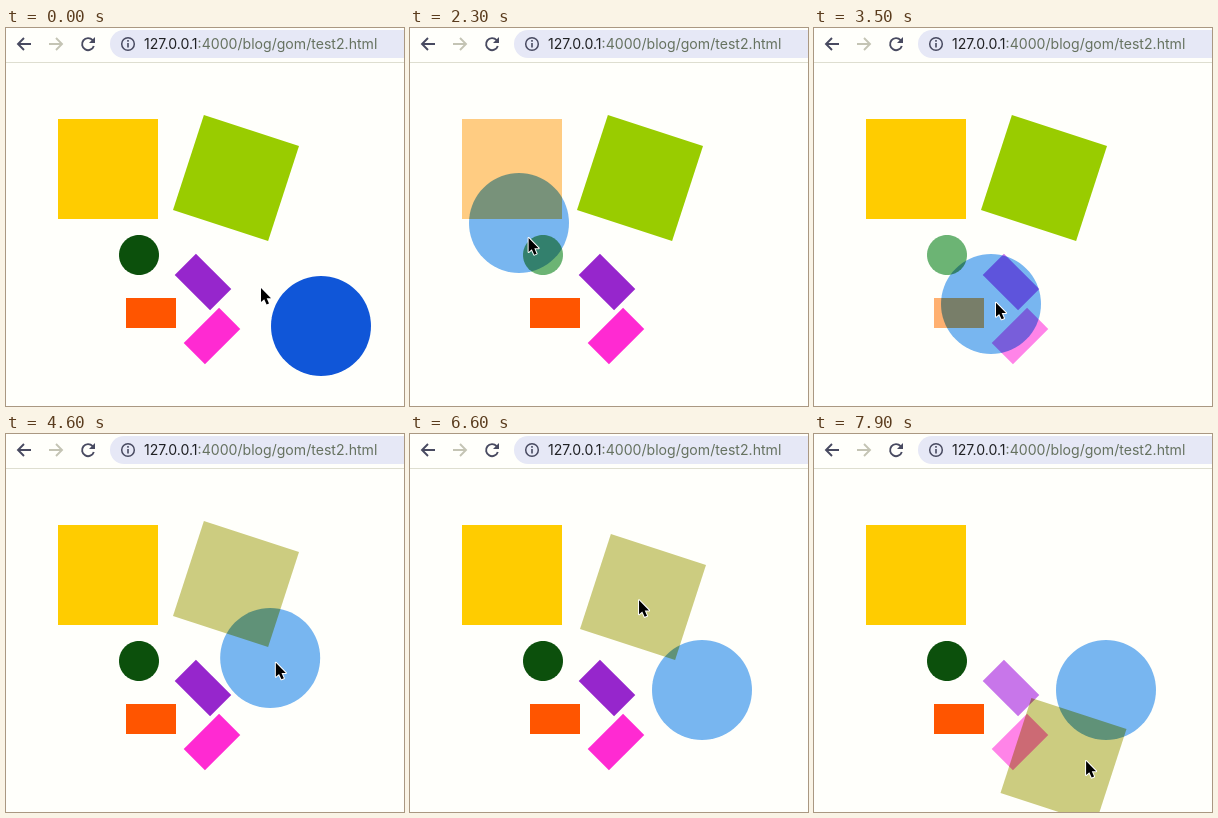
Recreate the animation shown at these times as an HTML page with a canvas. Size 398x378 px, loop 8 s.

```html
<!DOCTYPE html>
<html lang="en">
<head>
<meta charset="utf-8">
<title>Overlap test</title>
<style>
html, body { margin: 0; width: 100%; height: 100%; overflow: hidden; background: #fffffb; }
canvas, svg { position: absolute; left: 0; top: 0; display: block; }
text { font: 14.1px Inter, "Liberation Sans", sans-serif; }
</style>
</head>
<body>
<svg width="398" height="36" viewBox="0 0 398 36">
  <rect y="34" width="398" height="1" fill="#deded0"/>
  <rect x="104" y="2" width="320" height="28" rx="14" fill="#e6e8f6"/>
  <g fill="none" stroke="#484a60" stroke-width="1.9">
    <path d="M25 16H12.5M18 10l-6 6 6 6"/>
    <path d="M43 16H55.5M50 10l6 6-6 6" stroke="#c4c4b4"/>
    <path d="M86.6 12.2A6 6 0 1 0 87.8 18"/>
    <circle cx="122" cy="16" r="6.3" stroke-width="1.5"/>
    <path d="M122 15v4.5M122 12v1.7" stroke-width="1.6"/>
  </g>
  <path d="M89 9v6h-6z" fill="#484a60"/>
  <text x="138" y="21" fill="#202124">127.0.0.1<tspan fill="#667260">:4000/blog/gom/test2.html</tspan></text>
</svg>
<canvas id="stage" width="398" height="378"></canvas>
<script>
const LOOP = 8000, STEP = 100;
const LEAD = 80; // the pointer runs this far ahead of what it drags
const BALL_DRAG = [900, 5700], TILE_DRAG = [6300, 8000];
const ctx = document.getElementById('stage').getContext('2d');

// Key points of the hand: time, x, y.
const route = [
  [80, 255, 260], [700, 315, 298], [900, 315, 298],
  [1400, 174, 154], [1480, 145, 129], [1800, 128, 98], [2050, 98, 135],
  [2300, 109, 195], [2600, 147, 240], [3500, 177, 276], [4400, 250, 218],
  [5200, 292, 256], [5700, 292, 256], [6200, 230, 150], [6300, 230, 150],
  [6600, 233, 163], [7100, 149, 183], [7250, 124, 190], [7900, 249.5, 327], [8000, 274, 327]
];

function rect(x, y, w, h, deg) {
  const a = deg * Math.PI / 180, c = Math.cos(a), s = Math.sin(a);
  return [[-1, -1], [1, -1], [1, 1], [-1, 1]].map(([i, j]) => {
    const u = i * w / 2, v = j * h / 2;
    return [x + u * c - v * s, y + u * s + v * c];
  });
}

function disc(x, y, r) {
  return Array.from({ length: 72 }, (_, i) => {
    const a = i * Math.PI / 36;
    return [x + r * Math.cos(a), y + r * Math.sin(a)];
  });
}

const shape = (solid, soft, pts) => ({ solid, soft, pts });
const fixed = [
  shape('#ffcc00', '#ffcc82', rect(102, 141, 100, 100, 0)),
  shape('#0c500c', '#6cb474', disc(133, 227, 20)),
  shape('#ff5500', '#ffb070', rect(145, 285, 50, 30, 0)),
  shape('#9626cc', '#c876ea', rect(197, 254, 50, 30, 45)),
  shape('#ff2ad2', '#ff84e8', rect(206, 308, 50, 30, -45))
];
const ball = shape('#1056d8', '#78b6f0');
const tile = shape('#99cc00', '#cccc80');

// Smooth curve through the route that never overshoots a turning point.
function along(t) {
  const end = route.length - 1;
  if (t <= route[0][0]) return route[0].slice(1);
  if (t >= route[end][0]) return route[end].slice(1);
  const i = route.findIndex(row => row[0] > t) - 1;
  const span = route[i + 1][0] - route[i][0], u = (t - route[i][0]) / span, v = 1 - u;
  const slope = (k, axis) => {
    if (k === 0 || k === end) return 0;
    const before = route[k][axis] - route[k - 1][axis];
    const after = route[k + 1][axis] - route[k][axis];
    return before * after <= 0 ? 0 : (before + after) / (route[k + 1][0] - route[k - 1][0]);
  };
  return [1, 2].map(axis =>
    route[i][axis] * (1 + 2 * u) * v * v + route[i + 1][axis] * u * u * (3 - 2 * u)
      + span * u * v * (slope(i, axis) * v - slope(i + 1, axis) * u));
}

const dragged = (t, [from, to]) => along(Math.min(Math.max(t, from), to));

// Separating axis test for convex outlines.
function touches(a, b) {
  return [a, b].every(poly => poly.every(([x, y], i) => {
    const [p, q] = poly[(i + 1) % poly.length], nx = q - y, ny = x - p;
    const da = a.map(v => v[0] * nx + v[1] * ny), db = b.map(v => v[0] * nx + v[1] * ny);
    return Math.max(...da) > Math.min(...db) && Math.max(...db) > Math.min(...da);
  }));
}

function trace(pts) {
  ctx.beginPath();
  pts.forEach(([x, y]) => ctx.lineTo(x, y));
  ctx.closePath();
}

function fill(pts, color) {
  trace(pts);
  ctx.fillStyle = color;
  ctx.fill();
}

function drawPointer([x, y]) {
  const arrow = [[0, 0], [0, 14], [3.2, 11.2], [5.6, 16.6], [8, 15.6], [5.7, 10.3], [10, 10.2]];
  trace(arrow.map(([dx, dy]) => [x + dx, y + dy]));
  ctx.lineJoin = 'round';
  ctx.lineWidth = 2;
  ctx.strokeStyle = '#fff';
  ctx.stroke();
  ctx.fillStyle = '#000';
  ctx.fill();
}

function draw(t) {
  ctx.clearRect(0, 0, 398, 378);
  ball.pts = disc(...dragged(t, BALL_DRAG), 50);
  tile.pts = rect(...dragged(t, TILE_DRAG), 100, 100, 18);

  // Touching shapes turn soft, and their colours multiply where they overlap.
  const all = [...fixed, tile, ball];
  ctx.globalCompositeOperation = 'multiply';
  for (const s of all) {
    const hit = all.some(o => o !== s && touches(s.pts, o.pts));
    fill(s.pts, hit ? s.soft : s.solid);
  }
  ctx.globalCompositeOperation = 'source-over';
  drawPointer(along(t + LEAD));
}

const start = performance.now();
function tick() {
  const t = (performance.now() - start) % LOOP;
  draw(Math.floor(t / STEP) * STEP);
  requestAnimationFrame(tick);
}
tick();
</script>
</body>
</html>
```
